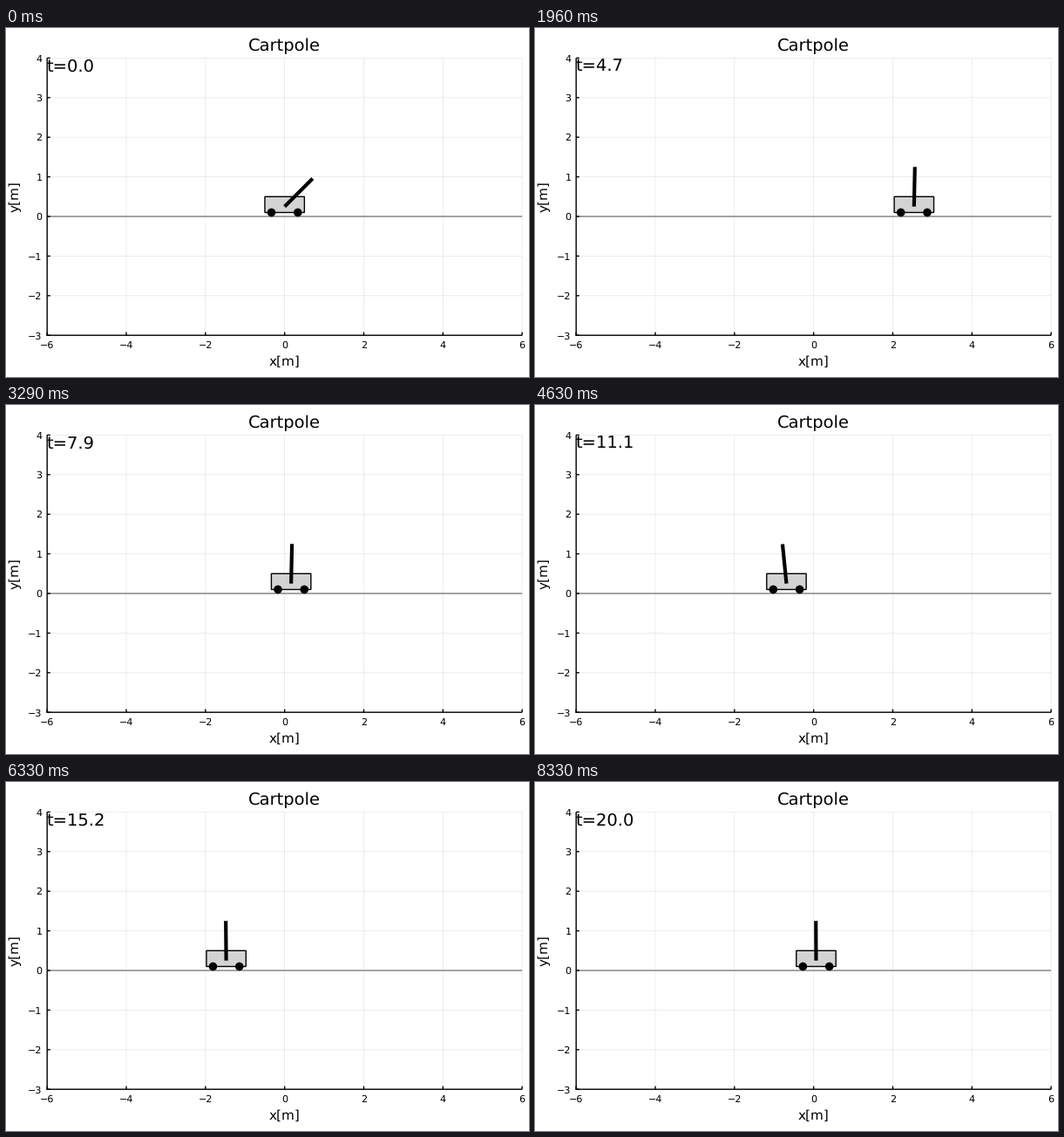
These frames come from a looping animation (600 px wide and 400 px high, 8.37 s). A matplotlib script:

```python
import numpy as np
import matplotlib.pyplot as plt
from matplotlib.animation import FuncAnimation
from matplotlib.patches import Circle, Rectangle

plt.rcParams["font.family"] = "DejaVu Sans"
plt.rcParams["text.hinting"] = "none"

W, H, DPI = 600, 400, 100
STEPS, LOOP_MS, DT = 201, 8370, 0.1
LEFT, RIGHT, TOP, BOTTOM = 47.2, 592.1, 34.4, 352.2
SCALE = (RIGHT - LEFT) / 12
G = 9.8
SLOW = -0.4 + 0.362j  # slow closed-loop pole
KICK = 10.0           # time of the push


def px(x):
    return LEFT + (x + 6) * SCALE


def py(y):
    return BOTTOM - (y + 3) * (BOTTOM - TOP) / 7


def decay(t, rate, *coef):
    return sum(c * t**k for k, c in enumerate(coef)) * np.exp(-rate * t)


def pose(t):
    """Cart position and pole angle: a slow mode plus a fast transient."""
    if t < KICK - 1e-9:
        z = 3.151 * np.exp(SLOW * (t - 4.2))
        fast_x = decay(t, 2.25, -0.852, -7.69)
        fast_a = decay(t, 2.5, 1.282, 2.9)
    else:
        u = t - KICK
        z = -1.707 * np.exp(SLOW * (t - 14.86))
        fast_x = decay(u, 2.3, -2.39, -1.83, 13.1)
        fast_a = decay(u, 2.3, -0.34, -2.375, -0.85)
    return z.real + fast_x, (SLOW**2 * z).real / G + fast_a


fig = plt.figure(figsize=(W / DPI, H / DPI), dpi=DPI, facecolor="white")
ax = fig.add_axes([0, 0, 1, 1])
ax.set(xlim=(0, W), ylim=(H, 0))
ax.axis("off")


def line(xs, ys, width, color="black", z=1, alpha=1):
    return ax.plot(xs, ys, lw=width, color=color, alpha=alpha, zorder=z,
                   solid_capstyle="butt", snap=False)[0]


def label(x, y, text, size, ha="center", **kw):
    return ax.text(x, y, text, fontsize=size, ha=ha, va="baseline",
                   zorder=9, **kw)


def num(v):
    return str(v).replace("-", "\u2212")


for v in range(-6, 7, 2):
    x = px(v)
    line([x, x], [TOP, BOTTOM], 0.5, alpha=0.1)
    line([x, x], [BOTTOM, BOTTOM - 3.6], 1, z=3)
    label(x, 367, num(v), 8)
for v in range(-3, 5):
    y = py(v)
    line([LEFT, RIGHT], [y, y], 0.5, alpha=0.1)
    line([LEFT, LEFT + 3.6], [y, y], 1, z=3)
    label(41.6, y + 4.2, num(v), 8, "right")

line([LEFT, RIGHT], [py(0)] * 2, 1, "gray", 2)
line([LEFT, LEFT], [TOP, BOTTOM + 0.7], 1, z=3)
line([LEFT - 0.7, RIGHT], [BOTTOM] * 2, 1, z=3)

label(319.5, 26, "Cartpole", 14)
label(319.5, 387, "x[m]", 11)
ax.text(16, 193.3, "y[m]", fontsize=11, rotation=90, ha="right",
        va="center", rotation_mode="default").set_x(18)
clock = label(46.35, 49.4, "", 14, "left")

cart = ax.add_patch(Rectangle((0, py(0.5)), SCALE, py(0.1) - py(0.5),
                              fc="lightgray", ec="black", lw=1, zorder=4,
                              joinstyle="miter", snap=False))
wheels = [ax.add_patch(Circle((0, py(0.1)), 4.8, fc="black", lw=0, zorder=5))
          for _ in range(2)]
pole = line([], [], 3, z=6)


def update(i):
    t = i * DT
    x, a = pose(t)
    clock.set_text(f"t={t:.1f}")
    cart.set_x(px(x - 0.5))
    for wheel, side in zip(wheels, (-1, 1)):
        wheel.center = px(x + side / 3), py(0.1)
    pole.set_data([px(x), px(x + np.sin(a))], [py(0.25), py(0.25 + np.cos(a))])
    return [clock, cart, pole, *wheels]


anim = FuncAnimation(fig, update, frames=STEPS, interval=LOOP_MS / STEPS,
                     repeat=True, repeat_delay=0, blit=False)
plt.show()
```
